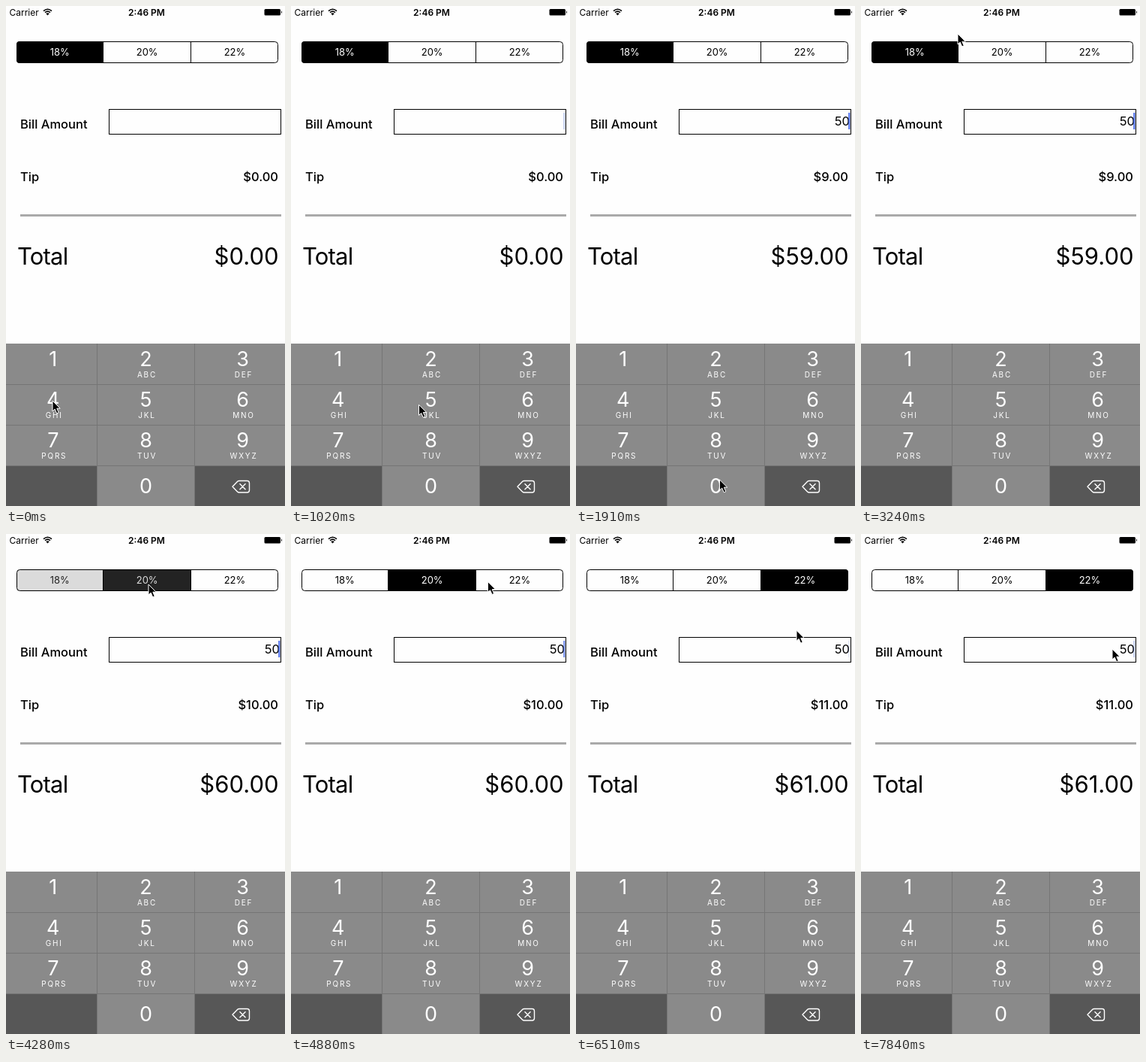
Write an HTML page that moves like this. It is 372x665 px and loops after 7990 ms.

```html
<!DOCTYPE html>
<html lang="en">
<head>
<meta charset="utf-8">
<title>Tip calculator</title>
<style>
  html, body { margin: 0; width: 100%; height: 100%; overflow: hidden; background: #fefefe; }
  svg { display: block; width: 372px; height: 665px; font-family: Inter, "Open Sans", sans-serif; }
  .label { font-size: 16.5px; font-weight: 500; }
  .big { font-size: 31px; }
  .segment { font-size: 13px; text-anchor: middle; }
  .status { font-size: 12px; }
  .digit { font-size: 27px; text-anchor: middle; fill: #fff; }
  .letters { font-size: 10px; letter-spacing: 1.8px; text-anchor: middle; fill: #fff; }
  .end { text-anchor: end; }
</style>
</head>
<body>
<svg id="stage" viewBox="0 0 372 665"></svg>
<script>
const LOOP = 7990;
const FRAME = 147.95;
const stage = document.getElementById('stage');

function add(tag, attrs, text) {
  const node = document.createElementNS('http://www.w3.org/2000/svg', tag);
  for (const name in attrs) node.setAttribute(name, attrs[name]);
  if (text !== undefined) node.textContent = text;
  return stage.appendChild(node);
}
const rect = (x, y, width, height, fill, more) => add('rect', { x, y, width, height, fill, ...more });
const label = (x, y, cls, text, more) => add('text', { x, y, class: cls, ...more }, text);
const path = (d, more) => add('path', { d, fill: 'none', ...more });

rect(0, 0, 372, 665, '#fefefe');

// Status bar
label(4.5, 13, 'status', 'Carrier');
label(187.5, 13, 'status', '2:46 PM', { 'text-anchor': 'middle', 'font-weight': 600 });
path('M50 6.6Q55.5 1.9 61 6.6M52 8.7Q55.5 5.6 59 8.7', { stroke: '#000', 'stroke-width': 1.6 });
path('M53.2 10.1Q55.5 8.5 57.8 10.1L55.5 12.6Z', { style: 'fill:#000' });
rect(344.5, 4, 21.5, 8.5, '#000', { rx: 1.5 });
path('M367 6.5Q369 8.2 367 10Z', { style: 'fill:#000' });

// Segmented control
const rates = [18, 20, 22];
const edges = [14, 129.5, 246.5, 363];
const segments = rates.map((rate, i) => ({
  box: rect(edges[i], 47, edges[i + 1] - edges[i], 29, '#000',
    { 'clip-path': 'inset(0 round ' + ['4px 0 0 4px', '0', '0 4px 4px 0'][i] + ')' }),
  text: label([71.7, 188.2, 305][i], 66.3, 'segment', rate + '%')
}));
rect(14.5, 47.5, 348, 28, 'none', { rx: 4, stroke: '#000' });
path('M129.5 47.5V75.5M246.5 47.5V75.5', { stroke: '#000' });

// Bill, tip and total
label(19, 163, 'label', 'Bill Amount');
rect(137.5, 137.5, 229, 33, '#fefefe', { stroke: '#000' });
const billText = label(365, 159.3, 'end', '', { 'font-size': 16.5 });
const caret = rect(363.3, 142, 2, 22, '#3f62e8');
label(19, 232.5, 'label', 'Tip');
const tipText = label(363, 232.5, 'label end', '');
rect(19, 277, 348, 3, '#aaa');
label(15, 343.5, 'big', 'Total', { 'letter-spacing': -0.8 });
const totalText = label(363.5, 343.5, 'big end', '');

// Keypad
const columns = [0, 122, 252, 372];
const centers = [62.8, 186.5, 315.5];
const letters = ['', 'ABC', 'DEF', 'GHI', 'JKL', 'MNO', 'PQRS', 'TUV', 'WXYZ'];
const keys = {};
rect(0, 449, 372, 216, '#757575');
for (let i = 0; i < 12; i++) {
  const col = i % 3, row = Math.floor(i / 3), top = 449 + row * 54;
  const name = i < 9 ? i + 1 : i === 10 ? 0 : '';
  const width = columns[col + 1] - columns[col] - (col < 2 ? 1 : 0);
  const box = rect(columns[col], top + (row ? 1 : 0), width, row ? 53 : 54, name === '' ? '#575757' : '#8a8a8a');
  if (name === '') continue;
  keys[name] = box;
  label(centers[col], top + (row < 3 ? 30 : 36.5), 'digit', name);
  if (letters[i]) label(centers[col] + 1.5, top + 45, 'letters', letters[i]);
}
path('M302 639.3L308.5 632.5Q309.5 631.5 311 631.5H321.5Q324.5 631.5 324.5 634.5V644Q324.5 647 321.5 647H311Q309.5 647 308.5 646ZM311.5 635.3L319.5 643.3M319.5 635.3L311.5 643.3',
  { stroke: '#fff', 'stroke-width': 1.4, 'stroke-linejoin': 'round' });

const pointer = path('M0 0V14L3.2 11.1L5.7 16.9L8.2 15.8L5.8 10.2H10.2Z',
  { stroke: '#fff', 'stroke-width': 1, style: 'fill:#000' });

// Pointer stops: time, x, y
const route = [
  [0, 62, 525], [280, 45, 505], [580, 100, 522], [870, 154, 540], [1020, 171, 530],
  [1170, 176, 528], [1460, 180, 536], [1610, 187, 610], [1750, 191, 630], [2050, 192, 630],
  [2340, 215, 605], [2500, 222, 560], [2800, 205, 300], [3090, 142, 75], [3235, 129, 37],
  [3530, 165, 58], [3830, 190, 67], [4420, 190, 67], [4720, 230, 65], [5010, 296, 62],
  [5310, 300, 62], [5600, 300, 66], [5750, 286, 82], [6200, 267, 112], [6930, 335, 153]
];

const clamp = v => Math.max(0, Math.min(1, v));
const money = v => '$' + v.toFixed(2);
const gray = v => { const c = Math.round(v); return `rgb(${c},${c},${c})`; };

function pointerAt(t) {
  const next = route.findIndex(stop => stop[0] > t);
  if (next < 0) return route[route.length - 1].slice(1);
  const a = route[next - 1], b = route[next];
  const k = (t - a[0]) / (b[0] - a[0]);
  return [a[1] + (b[1] - a[1]) * k, a[2] + (b[2] - a[2]) * k];
}

function caretAt(t) {
  if (t > 1300 && t < 2300) return 1;
  const phase = t < 1300 ? (t + 770) % 965 : t % 1000;
  return phase < 600 ? clamp((520 - phase) / 170) : clamp((phase - 790) / 90);
}

function draw(time) {
  const t = Math.max(0, Math.floor((time + 22) / FRAME) * FRAME - 20);
  const toSecond = clamp((t - 4012) / 300), toThird = clamp((t - 5024) / 300);
  const selected = [1 - toSecond, toSecond - toThird, toThird];
  segments.forEach((segment, i) => {
    segment.box.setAttribute('fill', gray(254 * (1 - selected[i])));
    segment.text.setAttribute('fill', gray(255 * selected[i]));
  });

  const bill = t < 1300 ? 0 : t < 1740 ? 5 : 50;
  const tip = bill * rates[toThird > 0 ? 2 : toSecond > 0 ? 1 : 0] / 100;
  billText.textContent = bill || '';
  tipText.textContent = money(tip);
  totalText.textContent = money(bill + tip);

  keys[5].setAttribute('fill', t > 1150 && t < 1300 ? '#575757' : '#8a8a8a');
  keys[0].setAttribute('fill', t > 1600 && t < 1740 ? '#575757' : '#8a8a8a');
  caret.setAttribute('opacity', caretAt(t));
  pointer.setAttribute('transform', `translate(${pointerAt(t).join(' ')})`);
}

function tick() {
  draw(performance.now() % LOOP);
  requestAnimationFrame(tick);
}
tick();
</script>
</body>
</html>
```
